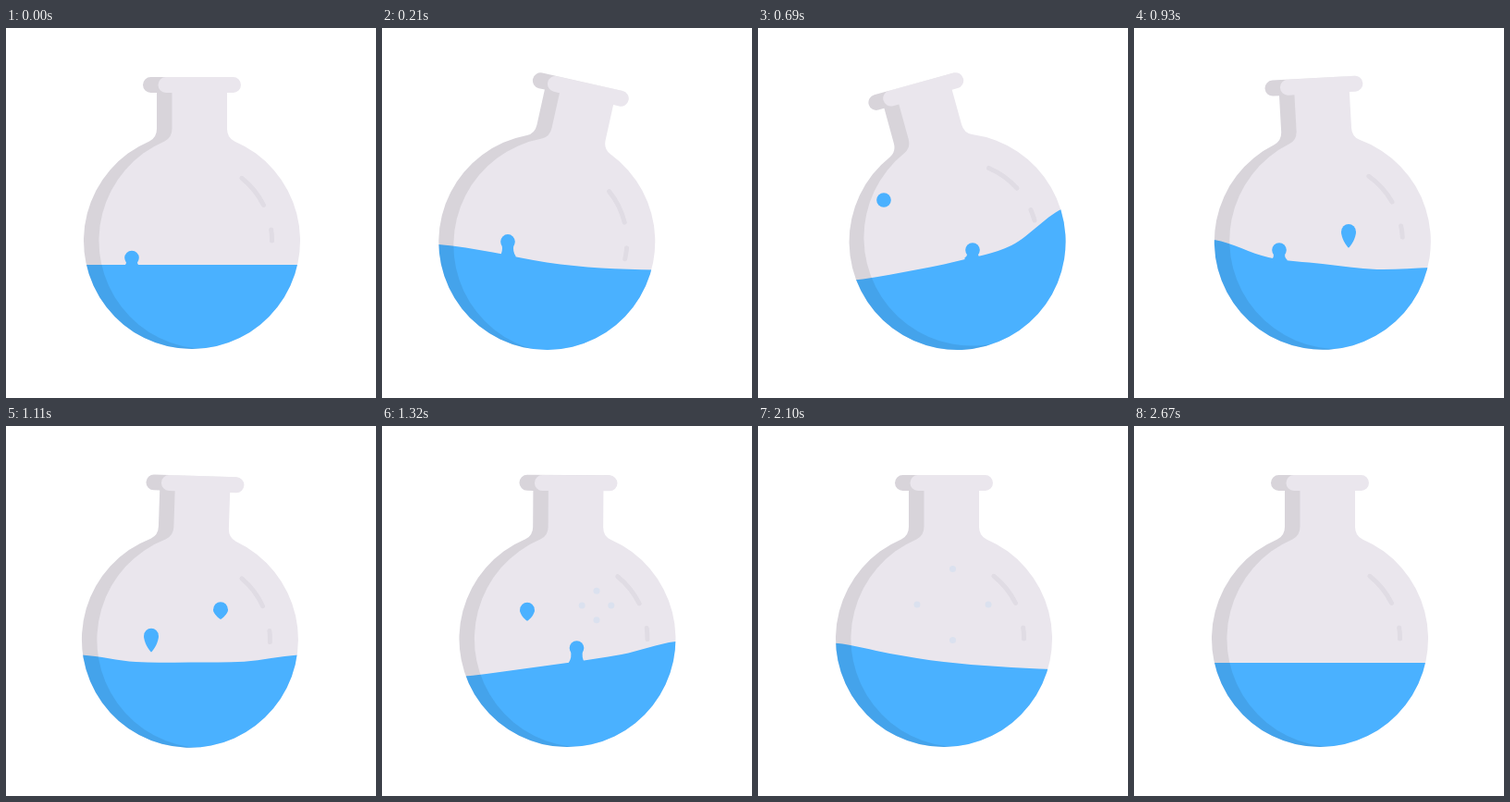
These frames come from a looping animation (400 by 400 pixels, 3700 ms). An HTML page with a canvas:

```html
<!DOCTYPE html>
<html lang="en">
<head>
<meta charset="utf-8">
<title>Flask</title>
<style>
  html, body { margin: 0; width: 100%; height: 100%; overflow: hidden; background: #fff; }
  canvas { display: block; width: 400px; height: 400px; }
</style>
</head>
<body>
<canvas id="stage"></canvas>
<script>
const LOOP = 3700, STEP = 30, LEVEL = 256, R = 117;
const BLUE = '#4ab1ff', GLASS = '#eae6ed', SHINE = '#e0dce4';

const canvas = document.getElementById('stage');
const ctx = canvas.getContext('2d');
const dpr = window.devicePixelRatio || 1;
canvas.width = canvas.height = 400 * dpr;

// Outline with the bulb centre at (201, 230)
const flask = new Path2D(
  'M156.5 53H245.5a8.5 8.5 0 0 1 0 17H239V109Q239 118.5 247 122.4' +
  'A117 117 0 1 1 155 122.4Q163 118.5 163 109V70H156.5a8.5 8.5 0 0 1 0-17Z');
const shade = new Path2D('M0 0H400V400H0Z');
shade.addPath(flask, new DOMMatrix([1, 0, 0, 1, 16.5, 0]));

// [time, dx, dy, degrees]
const sway = [
  [0, 0, 0, 0],
  [337, -33, 1.5, 18.2],
  [712, 15, 1, -15.7],
  [1055, -2.2, 0.8, 2],
  [1400, -0.3, 0, 0.1],
  [1800, 0, 0, 0]
];

// [time, surface offsets at five even places across the bulb]
const slosh = [
  [0, 0, 0, 0, 0, 0],
  [420, -44, -27, -5, 7, 11],
  [690, 17, 8, -4, -21, -62],
  [930, -27, -8, -1, 5, 3],
  [1320, 15, 8, 0, -9, -23],
  [2020, -22, -10.5, -1, 4.2, 7.3],
  [2670, 0, 0, 0, 0, 0]
];

const drops = [
  { x: 136, start: 70, pop: 710, top: 186 },
  { x: 232, start: 690, pop: 1285, top: 194 },
  { x: 157, start: 925, pop: 1540, top: 192 },
  { x: 210.5, start: 1320, pop: 1930, top: 193 }
];

const clamp = v => Math.min(1, Math.max(0, v));
const ease = v => (1 - Math.cos(Math.PI * clamp(v))) / 2;

function sample(keys, t) {
  const i = keys.findIndex(k => k[0] > t);
  if (i < 0) return keys[keys.length - 1].slice(1);
  const a = keys[i - 1], b = keys[i];
  const p = ease((t - a[0]) / (b[0] - a[0]));
  return a.slice(1).map((v, n) => v + (b[n + 1] - v) * p);
}

function fillLiquid(cx, h) {
  const gap = R / 2, left = cx - R;
  const y = i => LEVEL + h[Math.min(4, Math.max(0, i))];
  ctx.beginPath();
  ctx.moveTo(left - 20, y(0));
  ctx.lineTo(left, y(0));
  for (let i = 0; i < 4; i++) {
    const x = left + i * gap;
    ctx.bezierCurveTo(
      x + gap / 3, y(i) + (y(i + 1) - y(i - 1)) / 6,
      x + gap * 2 / 3, y(i + 1) - (y(i + 2) - y(i)) / 6,
      x + gap, y(i + 1));
  }
  ctx.lineTo(cx + R + 20, y(4));
  ctx.lineTo(cx + R + 20, 400);
  ctx.lineTo(left - 20, 400);
  ctx.fill();
}

function surfaceAt(x, cx, h) {
  const u = Math.min(3.999, Math.max(0, (x - cx + R) / R * 2));
  const i = Math.floor(u);
  return LEVEL + h[i] + (h[i + 1] - h[i]) * (u - i);
}

function disc(x, y, r) {
  ctx.beginPath();
  ctx.arc(x, y, r, 0, Math.PI * 2);
  ctx.fill();
}

function drawStem(x, y, foot) {
  const waist = (y + 6 + foot) / 2;
  ctx.beginPath();
  ctx.moveTo(x - 6.5, y + 3);
  ctx.quadraticCurveTo(x - 5, waist, x - 8.5, foot + 1);
  ctx.lineTo(x - 8.5, foot + 6);
  ctx.lineTo(x + 8.5, foot + 6);
  ctx.lineTo(x + 8.5, foot + 1);
  ctx.quadraticCurveTo(x + 5, waist, x + 6.5, y + 3);
  ctx.fill();
}

function drawTail(x, y, len) {
  ctx.beginPath();
  ctx.moveTo(x - 8, y);
  ctx.bezierCurveTo(x - 8, y + len * 0.42, x - 3, y + len * 0.85, x, y + len);
  ctx.bezierCurveTo(x + 3, y + len * 0.85, x + 8, y + len * 0.42, x + 8, y);
  ctx.fill();
}

function drawDrop(d, t, cx, h) {
  const age = t - d.start;
  if (age < -180 || t >= d.pop) return;
  const p = ease(age / 520);
  const y = 240 + (d.top - 240) * p + 26 * ease(-age / 180);
  const foot = surfaceAt(d.x, cx, h);
  disc(d.x, y, 7.8);
  if (p < 0.17) {
    if (foot > y) drawStem(d.x, y, foot);
  } else if (p < 0.97) {
    drawTail(d.x, y, 8 + 10 * (1 - clamp((p - 0.44) / 0.56) ** 2));
  }
}

function drawBurst(d, t) {
  const p = (t - d.pop) / 220;
  if (p < 0 || p >= 1) return;
  const r = 39 * (1 - (1 - p) ** 3);
  ctx.globalAlpha = 0.09;
  for (const [x, y] of [[1, 0], [0, 1], [-1, 0], [0, -1]]) disc(d.x + x * r, d.top + y * r, 3.5);
  ctx.globalAlpha = 1;
}

function drawShine(from, to) {
  ctx.beginPath();
  ctx.arc(201, 230, 86.5, from * Math.PI / 180, to * Math.PI / 180);
  ctx.stroke();
}

function draw(t) {
  const [dx, dy, deg] = sample(sway, t);
  const h = sample(slosh, t);
  const cx = 201 + dx;
  const world = () => ctx.setTransform(dpr, 0, 0, dpr, 0, 0);
  const body = () => {
    world();
    ctx.translate(cx, 230 + dy);
    ctx.rotate(deg * Math.PI / 180);
    ctx.translate(-201, -230);
  };

  world();
  ctx.fillStyle = '#fff';
  ctx.fillRect(0, 0, 400, 400);
  ctx.save();
  body();
  ctx.clip(flask);
  ctx.fillStyle = GLASS;
  ctx.fillRect(0, 0, 400, 400);
  ctx.strokeStyle = SHINE;
  ctx.lineWidth = 5;
  ctx.lineCap = 'round';
  drawShine(-51.5, -26.5);
  drawShine(-8, 0);

  world();
  ctx.fillStyle = BLUE;
  fillLiquid(cx, h);
  for (const d of drops) {
    drawDrop(d, t, cx, h);
    drawBurst(d, t);
  }

  body();
  ctx.fillStyle = 'rgba(0, 0, 8, 0.08)';
  ctx.fill(shade, 'evenodd');
  ctx.restore();
}

const began = performance.now();
function tick() {
  const t = (performance.now() - began) % LOOP;
  draw(Math.floor(t / STEP) * STEP);
  requestAnimationFrame(tick);
}
tick();
</script>
</body>
</html>
```
